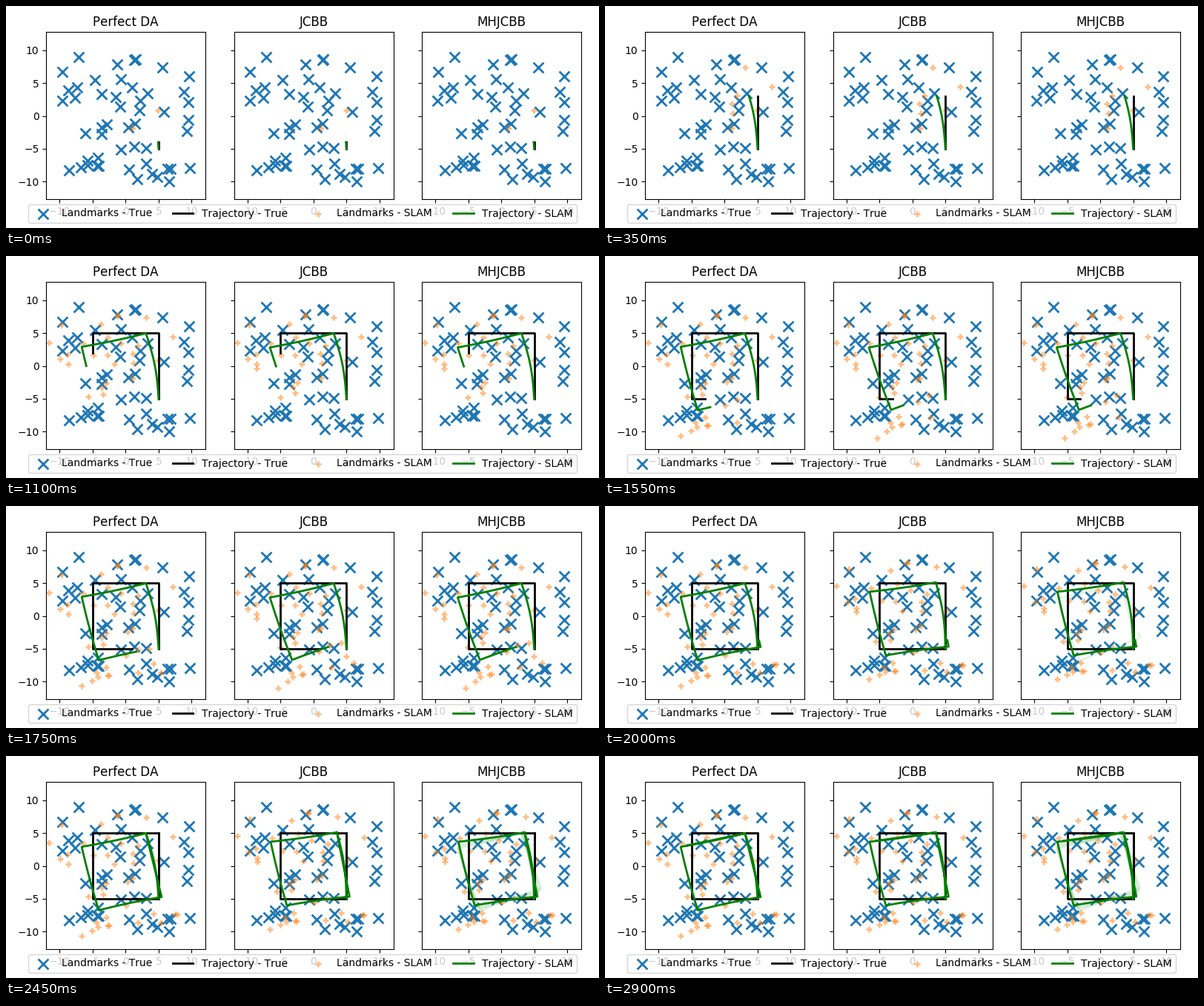
A matplotlib script that plays this animation: 800 px wide and 300 px high, repeating every 2.95 s.

```python
import numpy as np
import matplotlib.pyplot as plt
from matplotlib.animation import FuncAnimation

plt.rcParams["text.kerning_factor"] = 6

FRAMES, INTERVAL = 59, 50
LEG = 10              # steps along one side of the square
CLOSURE = 41          # step at which the loop is recognised
SIGHT, FOV = 5.0, np.radians(60)
BOW = [0.4, -0.1, 0.1, -0.1, 0, 0]   # outward bend of each estimated leg

rng = np.random.RandomState(0)
landmarks = rng.uniform(-10, 10, (50, 2))


def route(start, a, b, c, d, bows=np.zeros(6)):
    """Poses step by step around the corners, and on into a second lap."""
    stops = np.array([start, a, b, c, d, a, b], float)
    t = np.arange(LEG)[:, None] / LEG
    legs = []
    for p, q, bow in zip(stops, stops[1:], bows):
        dx, dy = q - p
        outward = np.array([dy, -dx]) / np.hypot(dx, dy)
        legs.append(p + t * (q - p) + bow * np.sin(np.pi * t) * outward)
    return np.vstack(legs + [stops[-1:]])


def estimate(*corners):
    return route((5, -5), *corners, bows=BOW)


truth = route((5, -5), (5, 5), (-5, 5), (-5, -5), (5, -5))
perfect = estimate((3.08, 4.95), (-6.66, 2.9), (-4.08, -6.73), (5.46, -4.72))
drifted = estimate((3.08, 4.95), (-6.6, 2.8), (-3.24, -6.68), (5.98, -3.55))
closed = estimate((3.55, 5.1), (-6.49, 3.67), (-4.03, -6), (5.48, -4.66))


def first_seen(point):
    """First step at which the sensor, looking ahead, sees the point."""
    for step in range(1, len(truth)):
        dx, dy = point - truth[step]
        hx, hy = truth[step] - truth[step - 1]
        angle = np.arctan2(abs(hx * dy - hy * dx), hx * dx + hy * dy)
        if np.hypot(dx, dy) <= SIGHT and angle <= FOV:
            return step
    return FRAMES + 2


def warp(points, path):
    """Carry points along with the four corners of an estimated lap."""
    a, b, c, d = path[LEG:5 * LEG:LEG]
    u, v = points[:, :1] / 5, points[:, 1:] / 5
    return ((a + b + c + d) + u * (a + d - b - c) + v * (a + b - c - d)
            + u * v * (a + c - b - d)) / 4


seen = np.array([first_seen(p) for p in landmarks])
found = warp(landmarks, perfect)
found_closed = warp(landmarks, closed)
found_drifted = np.where(seen[:, None] <= 2 * LEG, found, warp(landmarks, drifted))

# One landmark is matched wrongly, so it is mapped twice
double = np.hypot(*(landmarks - (-7.6, 2.8)).T).argmin()

# Other hypotheses keep part of the drift
ghost_paths = [closed + share * (drifted - closed)
               for share in np.linspace(1.2, 0.3, 4)]

fig = plt.figure(figsize=(8, 3), dpi=100)
true_style = dict(marker="x", s=100, color="C0", linewidths=2)
slam_style = dict(marker="+", s=36, color="C1", alpha=0.5, linewidths=2)
panels = []
for i, title in enumerate(["Perfect DA", "JCBB", "MHJCBB"]):
    ax = fig.add_axes([(54.2 + 253.35 * i) / 800, 39 / 300, 215 / 800, 226 / 300])
    ax.set(title=title, xlim=(-12.05, 12.12), ylim=(-12.645, 12.762),
           xticks=range(-10, 11, 5), yticks=range(-10, 11, 5))
    ax.tick_params(labelleft=i == 0)
    mark = ax.scatter(*landmarks.T, label="Landmarks - True", **true_style)
    real, = ax.plot([], [], "k", lw=2, label="Trajectory - True")
    dots = ax.scatter([], [], label="Landmarks - SLAM", **slam_style)
    ghosts = [ax.plot([], [], "g", lw=2, alpha=0.1)[0]
              for _ in ghost_paths] if i == 2 else []
    slam, = ax.plot([], [], "g", lw=2, label="Trajectory - SLAM")
    panels.append((real, slam, dots, ghosts))
fig.legend(handles=[mark, real, dots, slam], loc="lower center", ncol=4)


def draw(frame):
    step = frame + 1
    known = seen <= step
    for i, (real, slam, dots, ghosts) in enumerate(panels):
        if i == 0:
            path, spots = perfect, found
        elif step < CLOSURE:
            path, spots = drifted, found_drifted
        else:
            path, spots = closed, found_closed
        shown = spots[known]
        if i and known[double]:
            shown = np.vstack([shown, spots[double] - (0, 0.6)])
        real.set_data(*truth[:step + 1].T)
        slam.set_data(*path[:step + 1].T)
        dots.set_offsets(shown)
        for n, (line, ghost) in enumerate(zip(ghosts, ghost_paths)):
            shown_to = step + 1 if step >= CLOSURE + n else 0
            line.set_data(*ghost[:shown_to].T)
    return []


anim = FuncAnimation(fig, draw, frames=FRAMES, interval=INTERVAL,
                     repeat=True, repeat_delay=0)
plt.show()
```
